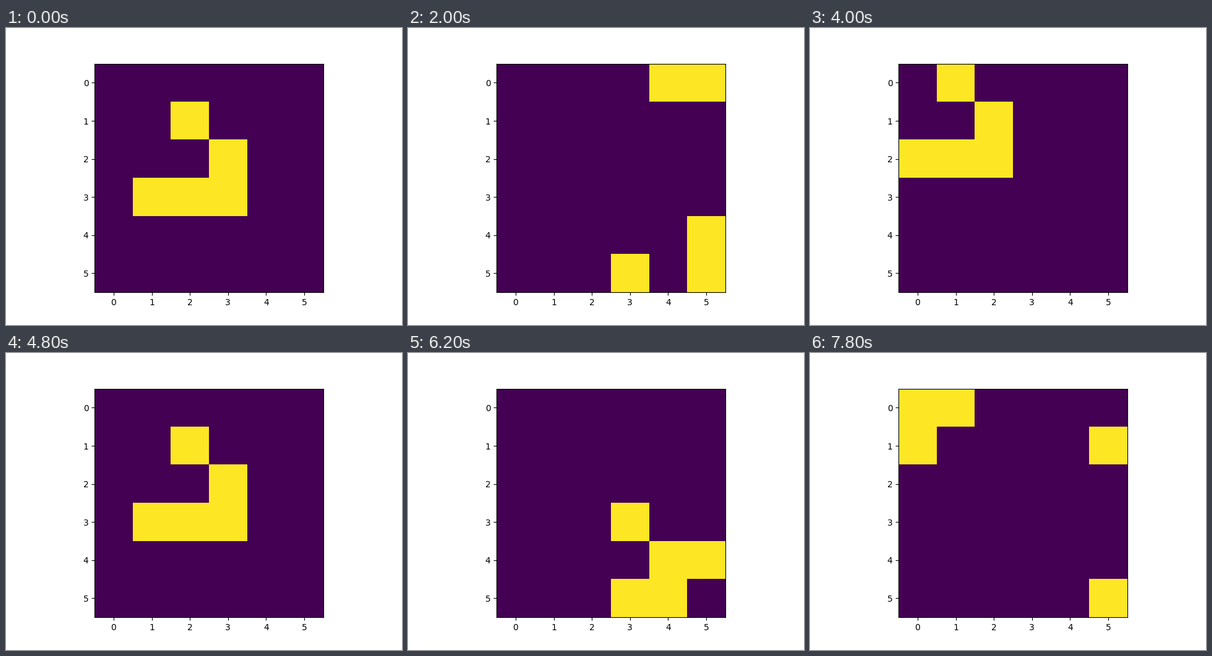
Write a matplotlib script that moves like this. It is 640x480 px and loops after 8000 ms.

```python
import numpy as np
import matplotlib.pyplot as plt
from matplotlib.animation import FuncAnimation

SIZE = 6
FRAMES = 40
STEP_MS = 200


def next_generation(grid):
    """One Game of Life step on a wrapping board."""
    shifts = [(dy, dx) for dy in (-1, 0, 1) for dx in (-1, 0, 1) if (dy, dx) != (0, 0)]
    neighbours = sum(np.roll(grid, s, axis=(0, 1)) for s in shifts)
    return ((neighbours == 3) | ((grid == 1) & (neighbours == 2))).astype(int)


glider = np.zeros((SIZE, SIZE), dtype=int)
glider[1:4, 1:4] = [[0, 1, 0], [0, 0, 1], [1, 1, 1]]

generations = [glider]
while len(generations) < FRAMES:
    generations.append(next_generation(generations[-1]))

fig, ax = plt.subplots(figsize=(6.4, 4.8), dpi=100)
board = ax.imshow(glider, cmap="viridis", vmin=0, vmax=1)


def update(frame):
    board.set_data(generations[frame])
    return [board]


anim = FuncAnimation(fig, update, frames=FRAMES, interval=STEP_MS,
                     repeat=True, repeat_delay=0)
plt.show()
```
